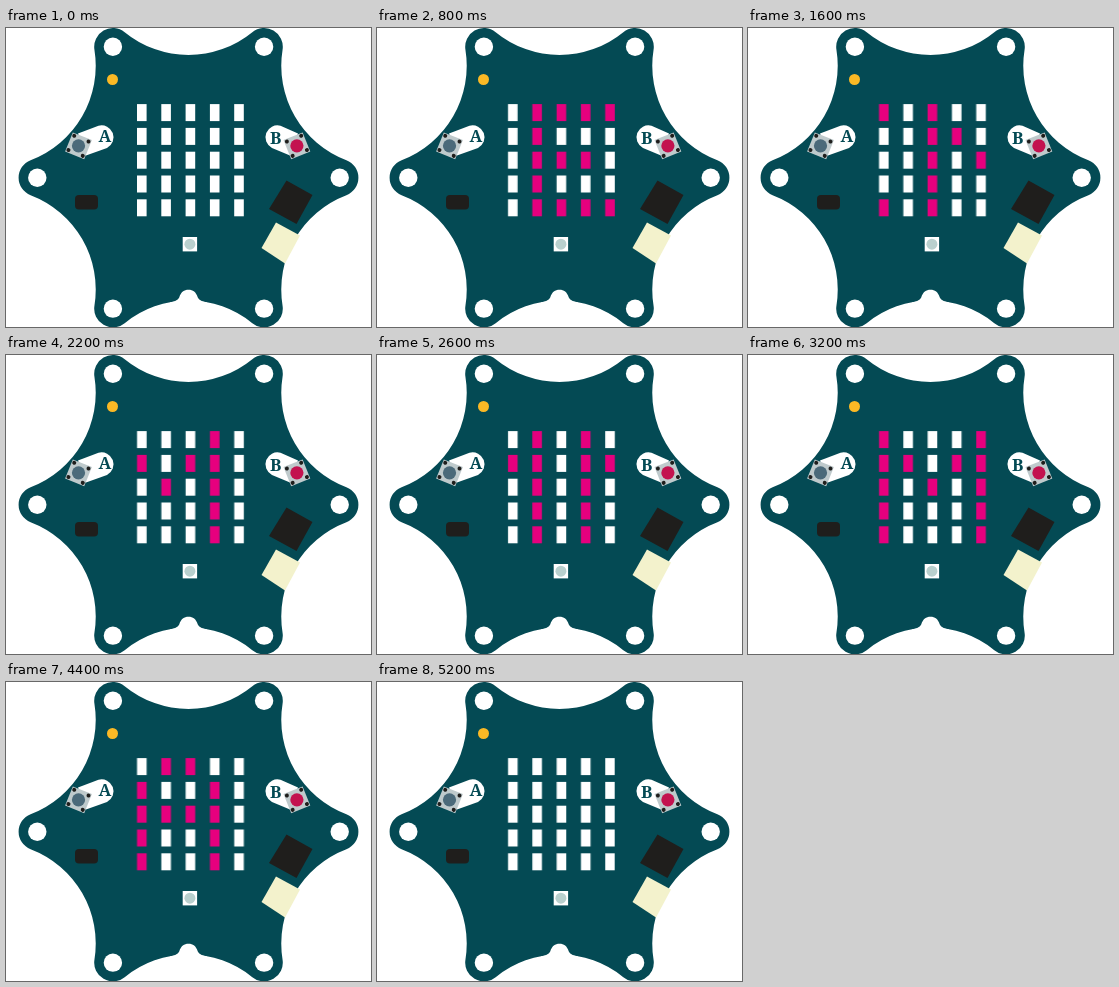
An HTML page that plays this animation: 365 by 299 pixels, repeating every 5400 ms.

```html
<!DOCTYPE html>
<html lang="en">
<head>
<meta charset="utf-8">
<title>Scrolling LED board</title>
<style>
  html, body { margin: 0; width: 100%; height: 100%; overflow: hidden; background: #fff; }
  svg { display: block; }
  .board { fill: #044a54; }
  .dark { fill: #1f1e1c; }
  .white { fill: #fff; }
  .pad { fill: #bfcacc; }
  .on { fill: #e6007e; }
  .label { font: bold 17px "Noto Serif", serif; text-anchor: middle; fill: #044a54; }
  /* One column per step: 27 steps of 200 ms */
  #strip { animation: scroll 5.4s steps(27, end) infinite; }
  @keyframes scroll {
    from { transform: translateX(0); }
    to { transform: translateX(-656.1px); }
  }
</style>
</head>
<body>
<svg width="365" height="299" viewBox="0 0 365 299">
  <defs>
    <clipPath id="window"><rect x="128" y="70" width="113" height="125"/></clipPath>
    <g id="pad">
      <rect class="pad" x="-10.3" y="-10.3" width="20.6" height="20.6"/>
      <g class="dark">
        <circle cx="-7.7" cy="-7.7" r="2"/>
        <circle cx="7.7" cy="-7.7" r="2"/>
        <circle cx="7.7" cy="7.7" r="2"/>
        <circle cx="-7.7" cy="7.7" r="2"/>
      </g>
    </g>
  </defs>

  <path id="outline" class="board"/>
  <g id="holes" class="white"></g>
  <path class="white" d="M164 274.4C170 273 172 272 173.2 269.5C175 264 178 261.8 182.5 261.8C187 261.8 190 264 191.8 269.5C193 272 195 273 201 274.4V279H164Z"/>

  <circle cx="106.5" cy="51.5" r="5.5" fill="#fbb925"/>
  <rect class="dark" x="69" y="167" width="23" height="14.5" rx="4"/>
  <rect class="white" x="176.7" y="209" width="14.4" height="14.4"/>
  <circle cx="183.9" cy="216.2" r="5.5" fill="#b9d0ce"/>
  <polygon class="dark" points="280.5,152.5 306.5,167 290.5,196 263,181"/>
  <polygon points="270,194.5 294,207.5 279,235.5 255.5,220" fill="#f3f2cc"/>

  <path class="white" d="M72 105.4L92.5 97.7A12 12 0 0 1 101 120L80 127.5Z"/>
  <use href="#pad" transform="translate(72.5 117.8) rotate(22)"/>
  <circle cx="72.5" cy="117.8" r="6.6" fill="#4b6a7a"/>
  <text class="label" x="98.8" y="114">A</text>

  <path class="white" d="M292 105.4L274.5 97.7A12 12 0 0 0 266 120L284 127.5Z"/>
  <use href="#pad" transform="translate(290.9 117.8) rotate(-22)"/>
  <circle cx="290.9" cy="117.8" r="6.6" fill="#c3124f"/>
  <text class="label" x="269.8" y="115.5">B</text>

  <g clip-path="url(#window)"><g id="strip"></g></g>
</svg>
<script>
  const byId = id => document.getElementById(id);

  function add(parent, tag, attrs) {
    const el = document.createElementNS("http://www.w3.org/2000/svg", tag);
    for (const key in attrs) el.setAttribute(key, attrs[key]);
    parent.appendChild(el);
  }

  const polar = ([x, y], r, deg) => {
    const a = deg * Math.PI / 180;
    return [x + r * Math.cos(a), y + r * Math.sin(a)];
  };

  // Six round lobes joined by concave arcs
  let outline = "";
  for (let deg = 0; deg < 360; deg += 60) {
    const lobe = polar([182.5, 149.7], 151.2, deg);
    const start = polar(lobe, 18.7, deg - 69);
    const end = polar(lobe, 18.7, deg + 69);
    outline += (deg ? "A101 101 0 0 0 " : "M") + start + "A18.7 18.7 0 0 1 " + end;
    add(byId("holes"), "circle", { cx: lobe[0], cy: lobe[1], r: 9.2 });
  }
  const first = polar(polar([182.5, 149.7], 151.2, 0), 18.7, -69);
  byId("outline").setAttribute("d", outline + "A101 101 0 0 0 " + first + "Z");

  // Message pixels, padded by one empty display on each side
  const rows = [
    "####.#...#.#...#..##.",
    "#....##.##.##.##.#..#",
    "###..#.#.#.#.#.#.####",
    "#....#...#.#...#.#..#",
    "####.#...#.#...#.#..#"
  ];
  rows.forEach((row, r) => {
    [..."....." + row + "....."].forEach((px, c) => {
      add(byId("strip"), "rect", {
        class: px === "#" ? "on" : "white",
        x: 131 + c * 24.3, y: 76.1 + r * 23.8, width: 9.6, height: 17
      });
    });
  });
</script>
</body>
</html>
```
